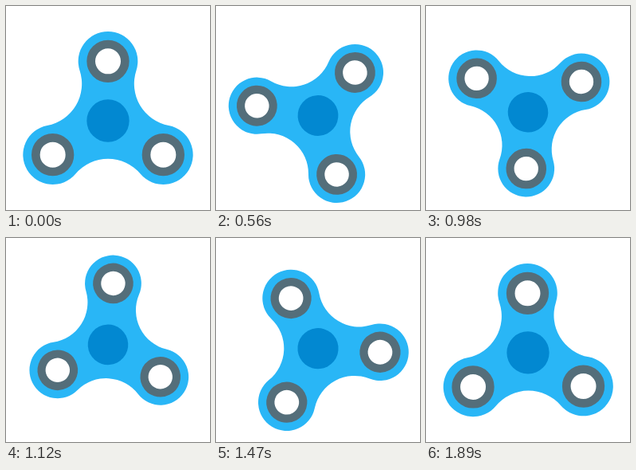
These frames come from a looping animation (256x256 px, 1.96 s). An HTML page:

```html
<!DOCTYPE html>
<html lang="en">
<head>
<meta charset="utf-8">
<title>Spinner</title>
<style>
  html, body { margin: 0; width: 100%; height: 100%; overflow: hidden; background: #fff; }
  svg { display: block; width: 100vw; height: 100vh; }
</style>
</head>
<body>
<svg viewBox="0 0 256 256">
  <g id="spinner">
    <path id="body" fill="#29b6f6"/>
    <circle cx="24" cy="27" r="5" fill="#0288d1"/>
    <g id="bearings" fill="#fff" stroke="#546e7a" stroke-width="2"></g>
  </g>
</svg>
<script>
const LOOP = 1960, STEP = 70;
const UNIT = 256 / 48;
const LOBE_R = 7, FILLET_R = 10;
const lobes = [[24, 13], [37, 35], [11, 35]];
const byId = id => document.getElementById(id);

// Point where a lobe meets the concave fillet centred at c.
function tangent([x, y], [cx, cy]) {
  const k = LOBE_R / (LOBE_R + FILLET_R);
  return [x + (cx - x) * k, y + (cy - y) * k];
}

function filletCenter([ax, ay], [bx, by]) {
  const dx = bx - ax, dy = by - ay, len = Math.hypot(dx, dy);
  const h = Math.sqrt((LOBE_R + FILLET_R) ** 2 - (len / 2) ** 2);
  return [(ax + bx) / 2 + dy / len * h, (ay + by) / 2 - dx / len * h];
}

function bodyPath() {
  const centers = lobes.map((p, i) => filletCenter(p, lobes[(i + 1) % 3]));
  let d = 'M' + tangent(lobes[0], centers[0]);
  for (let i = 0; i < 3; i++) {
    const next = (i + 1) % 3;
    d += `A${FILLET_R} ${FILLET_R} 0 0 0 ${tangent(lobes[next], centers[i])}`;
    d += `A${LOBE_R} ${LOBE_R} 0 1 1 ${tangent(lobes[next], centers[next])}`;
  }
  return d + 'Z';
}

// Symmetric cubic-bezier(a, 0, 1 - a, 1), solved by bisection.
function ease(x, a) {
  let lo = 0, hi = 1, u = 0.5;
  for (let i = 0; i < 30; i++) {
    u = (lo + hi) / 2;
    const v = 1 - u;
    const bx = 3 * a * u * v * v + 3 * (1 - a) * u * u * v + u ** 3;
    if (bx < x) lo = u; else hi = u;
  }
  return u * u * (3 - 2 * u);
}

const sine = x => (1 - Math.cos(Math.PI * x)) / 2;

function draw(ms) {
  const t = Math.floor(ms % LOOP / STEP) * STEP / LOOP;
  const angle = 360 * ease(t ? t + 0.002 : 0, 0.605);
  const y = 144 - 2 * UNIT * sine(2 * t);
  const shrink = sine(Math.min(1, Math.min(t, 1 - t) / 0.36));
  const scale = UNIT * (1 - 0.052 * shrink);
  byId('spinner').setAttribute('transform',
    `translate(128 ${y}) rotate(${angle}) scale(${scale}) translate(-24 -27)`);
}

byId('body').setAttribute('d', bodyPath());
byId('bearings').innerHTML =
  lobes.map(([x, y]) => `<circle cx="${x}" cy="${y}" r="4"/>`).join('');

let start;
function tick(now) {
  start ??= now;
  draw(now - start);
  requestAnimationFrame(tick);
}
draw(0);
requestAnimationFrame(tick);
</script>
</body>
</html>
```
